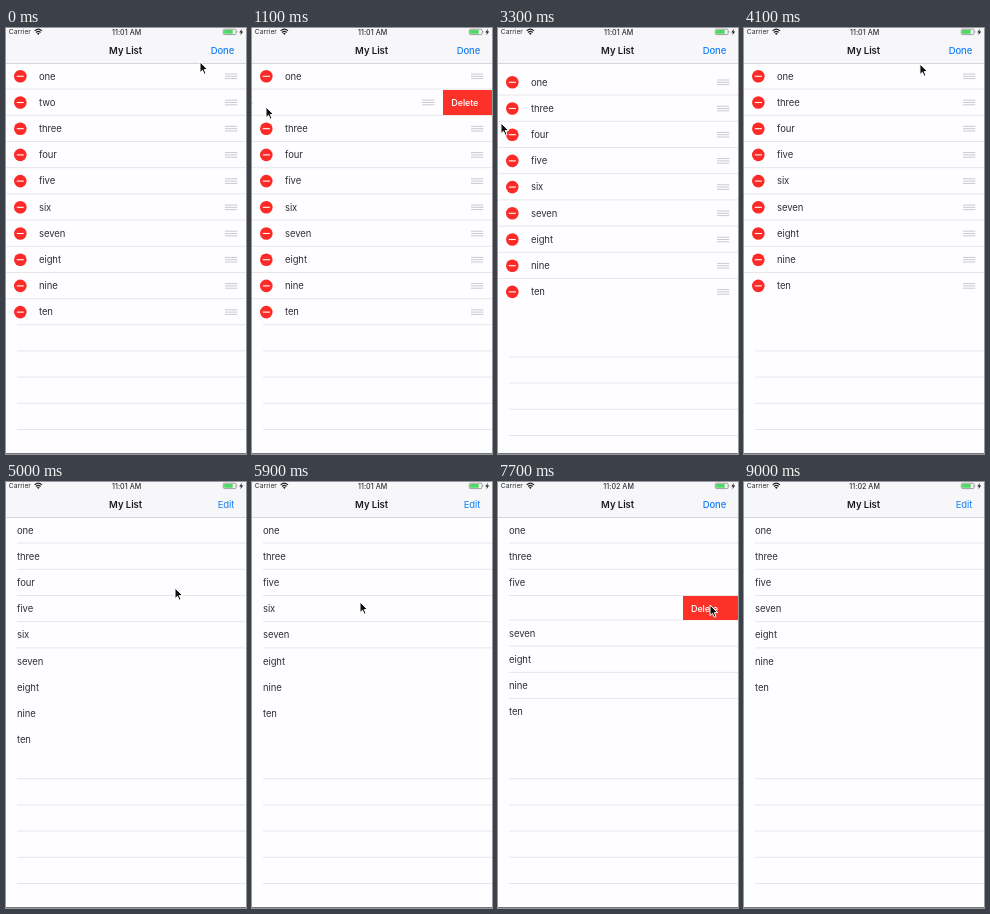
An HTML page that plays this animation: 240x426 px, repeating every 10 s.

```html
<!DOCTYPE html>
<html lang="en">
<head>
<meta charset="utf-8">
<title>My List</title>
<style>
html, body { margin: 0; width: 100%; height: 100%; overflow: hidden; background: #fefdff; }
svg { display: block; width: 100vw; height: 100vh; }
text { font: 9.5px Inter, Roboto, "Liberation Sans", sans-serif; letter-spacing: -.1px; fill: #303033; }
.small { font-size: 6.8px; letter-spacing: 0; }
.clock { font-size: 7.1px; font-weight: 500; letter-spacing: .05px; }
.title { font-weight: 600; letter-spacing: -.04px; fill: #1c1c1e; }
.action { fill: #147efb; }
.delete { font-size: 9px; font-weight: 500; fill: #fff; }
.line { stroke: #e5e4e8; stroke-width: .9; }
.red { fill: #fd3128; shape-rendering: crispEdges; }
</style>
</head>
<body>
<svg id="stage" viewBox="0 0 240 426">
  <rect width="240" height="426" fill="#fefdff"/>
  <g id="fillers"></g>
  <g id="list"></g>
  <rect width="240" height="35.5" fill="#f7f6f8"/>
  <path d="M0 35.5H240" stroke="#d6d5d9"/>
  <text class="small" x="2.7" y="6.4">Carrier</text>
  <g fill="none" stroke="#222" stroke-width="1.1">
    <path d="M28.6 2.9Q32.3 -.5 36 2.9M30 4.5Q32.3 2.4 34.6 4.5"/>
    <path d="M31 5.4L32.3 6.9L33.6 5.4Q32.3 4.3 31 5.4Z" fill="#222" stroke="none"/>
  </g>
  <text id="clock" class="clock" x="120.6" y="6.5" text-anchor="middle"></text>
  <rect x="217.3" y="1.2" width="12.8" height="5.4" rx="1.3" fill="none" stroke="#666" stroke-width=".6"/>
  <rect x="218.1" y="2" width="8.6" height="3.8" rx=".6" fill="#4cd964"/>
  <path d="M230.8 2.8q1 1.1 0 2.2z" fill="#666"/>
  <path d="M236 .8L233.2 4.4H235L234.3 7.2L237.2 3.4H235.3Z" fill="#222"/>
  <text class="title" x="119.6" y="25.6" text-anchor="middle">My List</text>
  <text id="action" class="action" x="228.2" y="25.6" text-anchor="end"></text>
  <path d="M0 425.5H240" stroke="#77767a"/>
  <path id="cursor" d="M0 0V10.6L2.5 8.3L4.2 12.2L6 11.4L4.3 7.6H7.7Z"
        fill="#111" stroke="#fff" stroke-width="1" stroke-linejoin="round"/>
</svg>
<script>
const LOOP = 10000, WIDTH = 240, TOP = 35.3, PITCH = 26.2;
const BUTTON = 55, FOLD = 260, TRAVEL = 550;
const NAMES = ["one", "two", "three", "four", "five", "six", "seven", "eight", "nine", "ten"];

// Each removal: when the row slides open, when it is confirmed, how far it slides.
const REMOVALS = {
  two: { open: 880, tap: 1840, reach: BUTTON },
  four: { open: 5060, tap: 5480, reach: 2 * BUTTON },
  six: { open: 7170, tap: 7660, reach: BUTTON }
};
// Pointer stops: arrival time and tip position.
const STOPS = [
  { at: 0, x: 194, y: 34 }, { at: 800, x: 14, y: 79 }, { at: 1700, x: 213, y: 76 },
  { at: 2800, x: 5, y: 88 }, { at: 3250, x: 3, y: 95 }, { at: 4250, x: 214, y: 23 },
  { at: 4950, x: 169, y: 106 }, { at: 5400, x: 60, y: 110 }, { at: 5880, x: 108, y: 120 },
  { at: 7000, x: 214, y: 124 }, { at: 7400, x: 159, y: 124 }, { at: 7620, x: 212, y: 123 },
  { at: 8200, x: 211, y: 133 }
];

const $ = id => document.getElementById(id);
const between = (t, a, b) => t >= a && t < b;

// Smooth 0 to 1 while t runs from a to b.
function ramp(t, a, b) {
  const p = Math.min(1, Math.max(0, (t - a) / (b - a)));
  return p * p * (3 - 2 * p);
}

function set(el, attrs) {
  for (const key in attrs) el.setAttribute(key, attrs[key]);
}

function add(parent, tag, attrs, text) {
  const el = document.createElementNS("http://www.w3.org/2000/svg", tag);
  set(el, attrs);
  if (text) el.textContent = text;
  return parent.appendChild(el);
}

// The pointer rests at a stop, then leaves in time to arrive at the next.
function pointer(t) {
  const i = STOPS.findIndex(s => s.at > t);
  if (i < 0) return STOPS[STOPS.length - 1];
  const a = STOPS[i - 1], b = STOPS[i];
  const e = ramp(t, Math.max(a.at + 60, b.at - TRAVEL), b.at);
  return { x: a.x + (b.x - a.x) * e, y: a.y + (b.y - a.y) * e };
}

const fillers = Array.from({ length: 5 }, (_, i) =>
  add($("fillers"), "path", { class: "line", d: `M11 ${TOP + PITCH * (10 + i) - .6}H240` }));

const rows = NAMES.map(name => {
  const g = add($("list"), "g", {});
  const line = add(g, "path", { class: "line" });
  const body = add(g, "g", {});
  const label = add(body, "text", { y: 16.3 }, name);
  const minus = add(body, "g", {});
  add(minus, "circle", { cx: 14.3, cy: 13, r: 6.3, fill: "#fc2b27" });
  add(minus, "path", { d: "M10.8 13H17.8", stroke: "#fff", "stroke-width": 1.1 });
  const grip = add(body, "path", {
    d: "M219 10.7H231.3M219 13H231.3M219 15.3H231.3", stroke: "#c6c5ca", "stroke-width": .9
  });
  const row = { name, g, line, body, label, minus, grip, removal: REMOVALS[name] };
  if (row.removal) {
    row.red = add(g, "rect", { class: "red" });
    row.remove = add(g, "text", { class: "delete", y: 16.2 }, "Delete");
  }
  return row;
});

function drawRemoval(row, t, h) {
  const { open, tap, reach } = row.removal;
  const spread = ramp(t, tap + 45, tap + 150);
  const slide = reach * ramp(t, open, open + 280) + (WIDTH - reach) * spread;
  set(row.body, { transform: `translate(${-slide} 0)`, opacity: spread > .3 ? 0 : 1 });
  set(row.red, { x: WIDTH - slide, width: slide, height: Math.max(0, h - .6) });
  set(row.remove, { x: WIDTH - slide + 8, opacity: 1 - spread });
}

function drawRow(row, y, t, edit, allLines) {
  const fold = row.removal ? ramp(t, row.removal.tap, row.removal.tap + FOLD) : 0;
  const h = PITCH * (1 - fold);
  set(row.g, { transform: `translate(0 ${y})`, visibility: fold < 1 ? "visible" : "hidden" });
  set(row.label, { x: 11 + 22 * edit });
  set(row.minus, { transform: `translate(${28 * (edit - 1)} 0)` });
  set(row.grip, { transform: `translate(${25 * (1 - edit)} 0)` });
  // Lower separators only show in editing states.
  const lined = row.name !== "ten" && (allLines || y + h < 170);
  set(row.line, { d: `M${11 * (1 - edit)} ${h - .4}H240`, opacity: lined ? 1 : 0 });
  if (row.removal) drawRemoval(row, t, h);
  return y + h;
}

function render(t) {
  const edit = 1 - ramp(t, 4350, 4650);
  const pull = 6 * (ramp(t, 2800, 3200) - ramp(t, 3550, 3850));
  const tip = pointer(t);
  const swiping = Object.values(REMOVALS).some(r => between(t, r.open, r.tap + FOLD));
  const done = t < 4400 || swiping;

  let top = TOP + pull;
  for (const row of rows) top = drawRow(row, top, t, edit, done);
  set($("fillers"), { transform: `translate(0 ${pull})` });
  set(fillers[0], { opacity: between(t, REMOVALS.two.tap, 4400) ? 0 : 1 });

  $("clock").textContent = t < 6600 ? "11:01 AM" : "11:02 AM";
  $("action").textContent = done ? "Done" : "Edit";
  set($("action"), { "font-weight": done ? 500 : 400, style: `font-weight:${done ? 500 : 400}` });
  set($("cursor"), { transform: `translate(${tip.x} ${tip.y})`, opacity: t < 8500 ? 1 : 0 });
}

const start = performance.now();
function tick() {
  render((performance.now() - start) % LOOP);
  requestAnimationFrame(tick);
}
tick();
</script>
</body>
</html>
```
